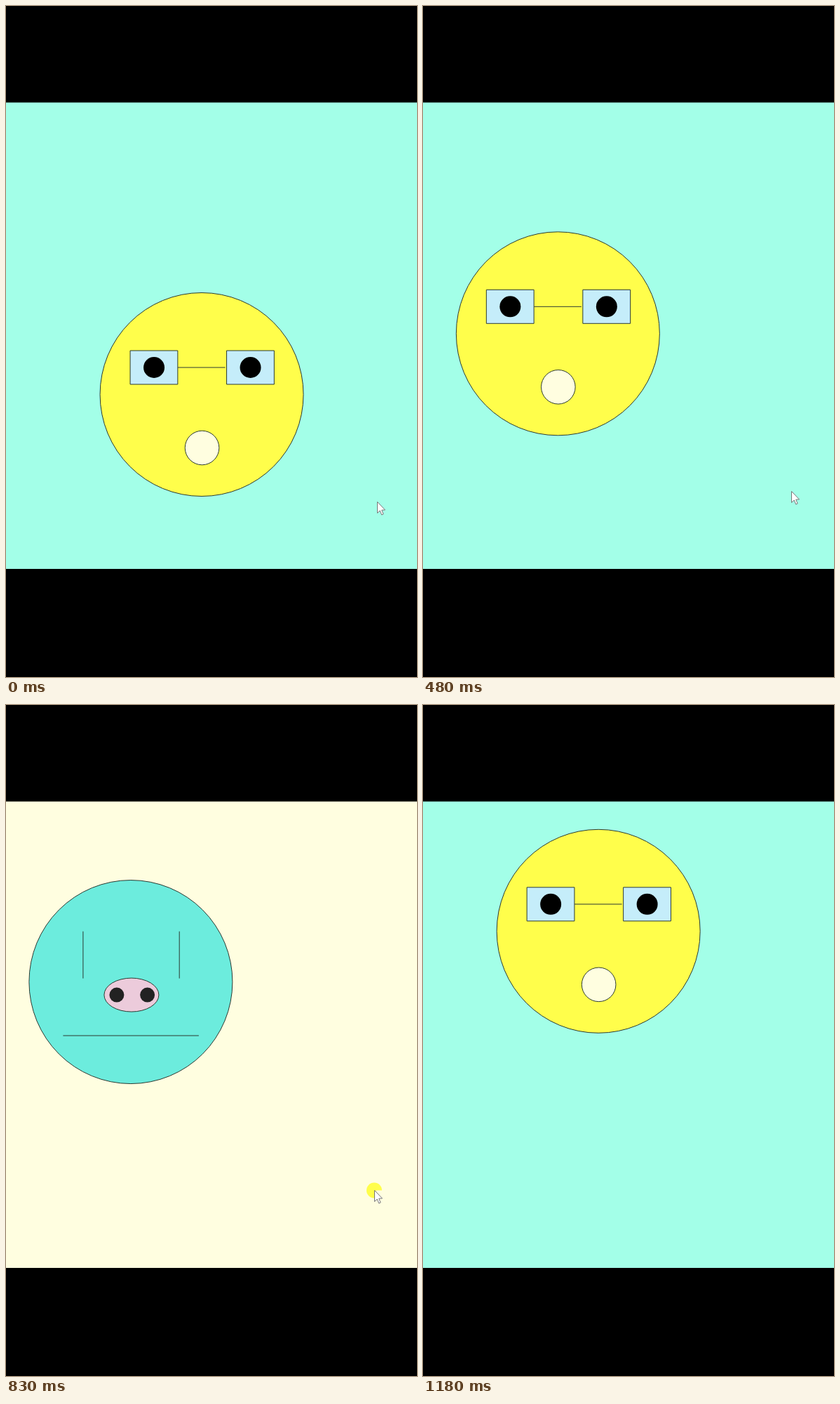
An HTML page with a canvas for the animation above (1250 ms loop, 586x956 px).

```html
<!DOCTYPE html>
<html lang="en">
<head>
<meta charset="utf-8">
<title>Bouncing face</title>
<style>
  html, body { margin: 0; height: 100%; overflow: hidden; background: #000; }
  canvas { display: block; }
</style>
</head>
<body>
<canvas id="stage" width="586" height="956"></canvas>
<script>
const ctx = document.getElementById("stage").getContext("2d");
const LOOP = 1250, STEP = 14.45, INK = "#2c3a32";

function shape(fill, stroke = INK) {
  if (fill) { ctx.fillStyle = fill; ctx.fill(); }
  if (stroke) { ctx.strokeStyle = stroke; ctx.stroke(); }
}

function oval(x, y, rx, ry, fill, stroke) {
  ctx.beginPath();
  ctx.ellipse(x, y, rx, ry, 0, 0, Math.PI * 2);
  shape(fill, stroke);
}

function box(x, y, w, h, fill) {
  ctx.beginPath();
  ctx.rect(x, y, w, h);
  shape(fill);
}

function line(x1, y1, x2, y2) {
  ctx.beginPath();
  ctx.moveTo(x1, y1);
  ctx.lineTo(x2, y2);
  shape(null);
}

function glassesFace() {
  oval(0, 0, 145, 145, "#fffe4b");
  for (const x of [-102, 35.5]) {
    box(x, -62.5, 67.8, 48, "#c5edfa");
    oval(x + 34, -38.5, 15, 15, "#000", null);
  }
  line(-34, -38.5, 33.5, -38.5);
  oval(0.5, 76, 24.3, 24.3, "#fffee0");
}

function pigFace() {
  oval(0, 0, 145, 145, "#6cecdd");
  line(-68, -72, -68, -5);
  line(69.3, -72, 69.3, -5);
  oval(1, 18.5, 39, 24, "#eccbdb");
  oval(-20, 18.5, 10.5, 10.5, "#222", null);
  oval(23.7, 18.5, 10.5, 10.5, "#222", null);
  line(-96.5, 76.5, 97, 76.5);
}

function cursor(x, y, pressed, back) {
  if (pressed) {
    oval(x - 0.5, y, 11, 11, "#fffe4b", null);
    ctx.fillStyle = back;
    ctx.fillRect(x + 2, y, 10, 12);
  }
  ctx.save();
  ctx.translate(x, y);
  ctx.beginPath();
  ctx.moveTo(0, 0);
  for (const [px, py] of [[0, 16], [3.7, 12.5], [6.2, 18.5], [8.6, 17.4], [6.2, 11.7], [11, 11.5]]) {
    ctx.lineTo(px, py);
  }
  ctx.closePath();
  shape("#fff", "#777");
  ctx.restore();
}

function draw(t) {
  const tick = Math.floor((t + (t >= 200 ? 10 : 0)) / 70);
  const step = tick < 2 ? tick : tick - 1;   // one tick stalls early on
  const pressed = tick >= 8 && tick <= 12;
  const back = pressed ? "#fffee0" : "#a3ffe8";

  ctx.fillStyle = "#000";
  ctx.fillRect(0, 0, 586, 956);
  ctx.fillStyle = back;
  ctx.fillRect(0, 137.5, 586, 664.5);

  ctx.save();
  ctx.translate(149 + STEP * Math.abs(step - 9), 553.5 - STEP * step);
  (pressed ? pigFace : glassesFace)();
  ctx.restore();

  const drift = Math.max(0, 2 - tick) / 2;
  if (tick < 17) cursor(525.5 + 4 * drift, 691.5 + 15 * drift, pressed, back);
}

function loop() {
  draw(performance.now() % LOOP);
  requestAnimationFrame(loop);
}
loop();
</script>
</body>
</html>
```
